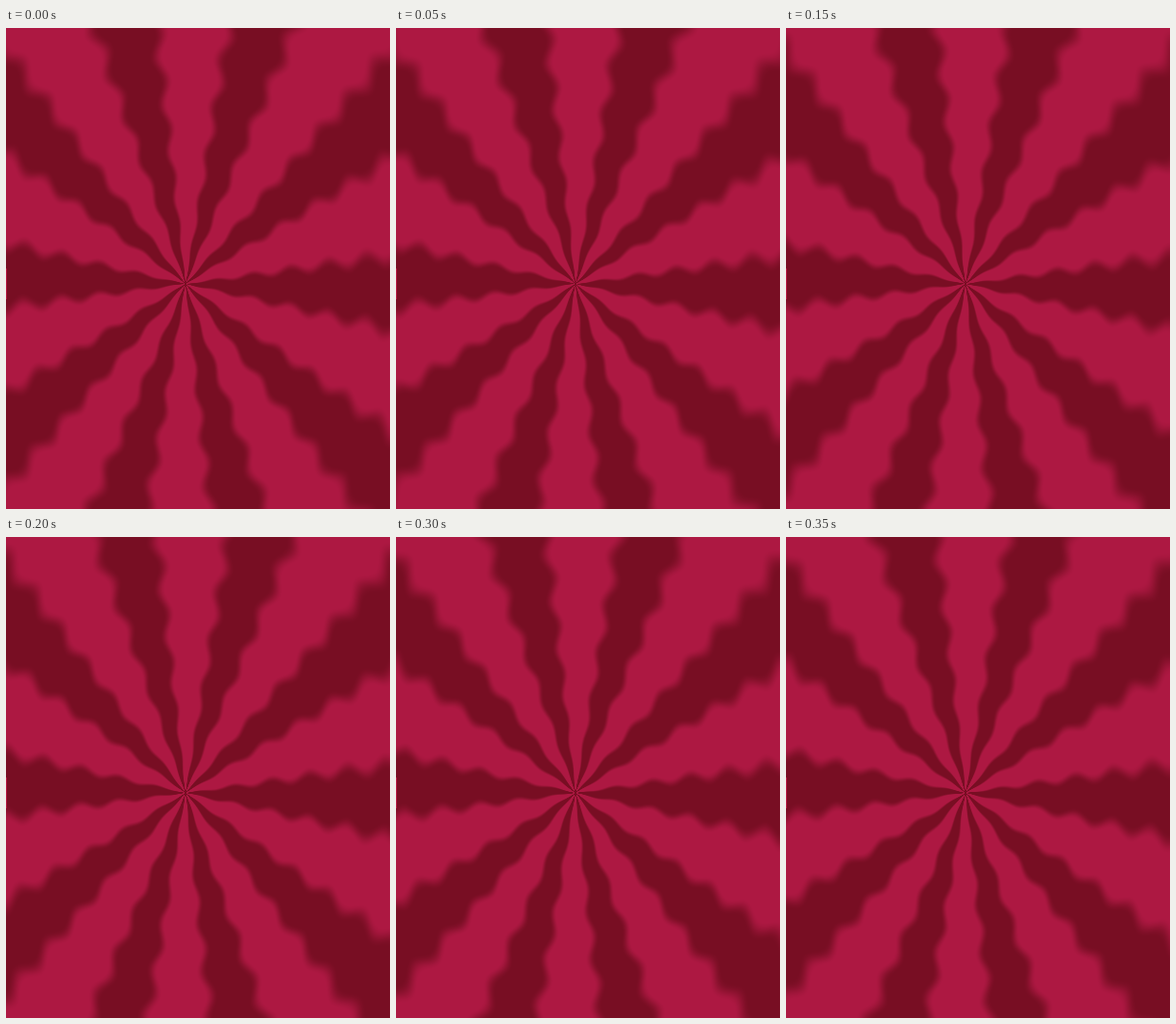
Recreate the animation shown at these times as an HTML page with a canvas. Size 400 by 500 pixels, loop 0.4 s.

```html
<!DOCTYPE html>
<html lang="en">
<head>
<meta charset="utf-8">
<title>Rippling rays</title>
<style>
  html, body { margin: 0; width: 100%; height: 100%; overflow: hidden; background: #780e23; }
  canvas { display: block; width: 100vw; height: 100vh; }
</style>
</head>
<body>
<canvas id="stage" width="400" height="500"></canvas>
<script>
  const W = 400, H = 500;
  const STEPS = 8, STEP_MS = 50;
  const CX = 187, CY = 266, SQUASH = 0.8;
  const RAYS = 10, TILT = 0.035, BIAS = 0.15, SOFT = 0.4;
  const WAVE = 40, CREST = 190, AMP = 8, RAMP = 250;
  const LIGHT = [173, 24, 66], DARK = [120, 14, 35];

  const ctx = document.getElementById('stage').getContext('2d');

  // Polar coordinates of every pixel, in a space where the rays are evenly spaced
  const angle = new Float32Array(W * H);
  const radius = new Float32Array(W * H);
  for (let y = 0, i = 0; y < H; y++) {
    for (let x = 0; x < W; x++, i++) {
      const dx = x + 0.5 - CX, dy = (y + 0.5 - CY) * SQUASH;
      angle[i] = Math.atan2(dx, -dy);
      radius[i] = Math.hypot(dx, dy);
    }
  }

  function smooth(v) {
    const u = Math.min(1, Math.max(0, (v + SOFT) / (2 * SOFT)));
    return u * u * (3 - 2 * u);
  }

  // Ripples run inward by one wavelength per loop
  function render(step) {
    const img = ctx.createImageData(W, H), px = img.data;
    const crest = CREST - WAVE * step / STEPS;
    for (let i = 0, p = 0; i < W * H; i++, p += 4) {
      const d = radius[i];
      const swing = AMP * (1 - Math.exp(-d / RAMP)) / d;
      const turn = TILT - swing * Math.cos(2 * Math.PI * (d - crest) / WAVE);
      const mix = smooth(Math.cos(RAYS * (angle[i] - turn)) + BIAS);
      for (let c = 0; c < 3; c++) px[p + c] = DARK[c] + (LIGHT[c] - DARK[c]) * mix;
      px[p + 3] = 255;
    }
    return img;
  }

  const cache = [];
  const start = performance.now();
  let shown = -1;

  function draw(now) {
    const step = Math.floor(Math.max(0, now - start) / STEP_MS) % STEPS;
    if (step !== shown) {
      ctx.putImageData(cache[step] || (cache[step] = render(step)), 0, 0);
      ctx.fillStyle = '#b5163f';
      ctx.fillRect(0, 250, 1, 32);
      shown = step;
    }
    requestAnimationFrame(draw);
  }
  draw(start);
</script>
</body>
</html>
```
